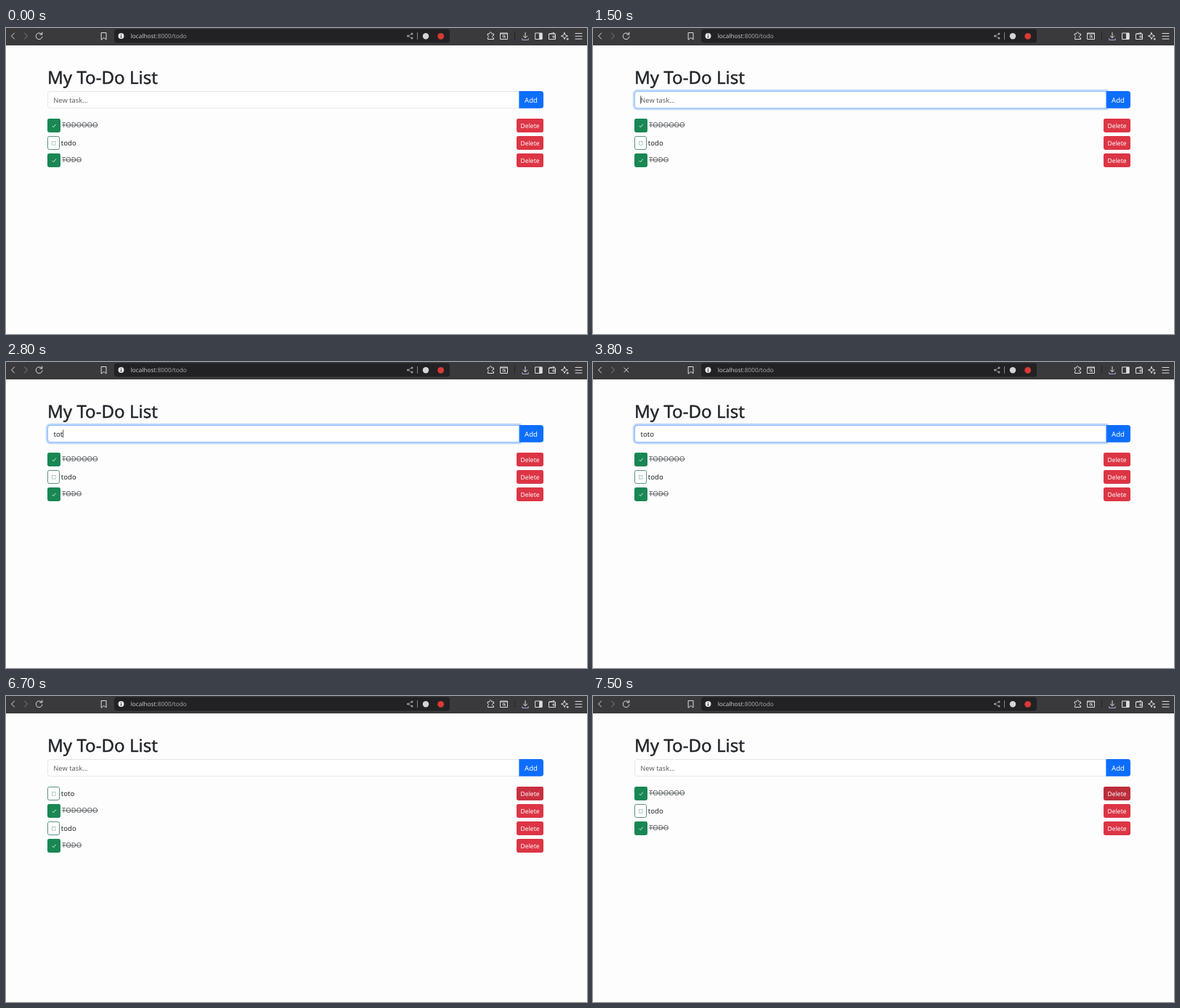
An HTML page for the animation above (8000 ms loop, 800 by 422 pixels).

```html
<!DOCTYPE html>
<html lang="en">
<head>
<meta charset="utf-8">
<title>My To-Do List</title>
<style>
  html, body { margin: 0; width: 100%; height: 100%; overflow: hidden; background: #fdfdfd; }
  svg { display: block; width: 100%; height: 100%; }
  text { font: 9.6px "Noto Sans", "Open Sans", sans-serif; fill: #212529; text-rendering: geometricPrecision; }
  .title { font-size: 24.1px; stroke: #212529; stroke-width: .4px; }
  .hint { font-size: 9.3px; fill: #5c6064; }
  .url { font-size: 8.25px; fill: #c9c9cc; }
  .url tspan { fill: #a4a4a8; }
  .small { font-size: 8.55px; fill: #fff; }
  .light { fill: #fff; }
  .done { fill: #585c5f; text-decoration: line-through; }
  .icon { fill: none; stroke: #dedee0; stroke-width: 1; stroke-linecap: round; stroke-linejoin: round; }
  .dim { stroke: #85858a; }
  .delete { color: #dc3545; }

  .anim { animation: 8s step-end infinite; }
  .idle { animation-name: idle; }
  .busy { animation-name: busy; }
  .focus { animation-name: focus; }
  .placeholder { animation-name: placeholder; }
  .caret { animation-name: caret; }
  .k1 { animation-name: key1; }
  .k2 { animation-name: key2; }
  .k3 { animation-name: key3; }
  .k4 { animation-name: key4; }
  .added { animation-name: added; }
  .list { animation-name: shift; }
  .press { animation-name: press; }
  .hover { animation-name: hover; }

  @keyframes idle {
    0%, 50%, 92.5% { visibility: visible; }
    47.5%, 90% { visibility: hidden; }
  }
  @keyframes busy {
    0%, 50%, 92.5% { visibility: hidden; }
    47.5%, 90% { visibility: visible; }
  }
  @keyframes focus {
    0%, 48.75% { opacity: 0; }
    17.5% { opacity: .4; }
    18.75% { opacity: .9; }
    20% { opacity: 1; }
  }
  @keyframes placeholder {
    0%, 48.75% { visibility: visible; }
    31.25% { visibility: hidden; }
  }
  @keyframes caret {
    0%, 23.75%, 45%, 100% { visibility: hidden; transform: none; }
    17.5% { visibility: visible; transform: none; }
    31.25% { visibility: visible; transform: translateX(3.7px); }
    33.75% { visibility: visible; transform: translateX(9.4px); }
    35% { visibility: visible; transform: translateX(12.9px); }
    37.5% { visibility: visible; transform: translateX(18.8px); }
  }
  @keyframes key1 { 0%, 48.75% { visibility: hidden; } 31.25% { visibility: visible; } }
  @keyframes key2 { 0%, 48.75% { visibility: hidden; } 33.75% { visibility: visible; } }
  @keyframes key3 { 0%, 48.75% { visibility: hidden; } 35% { visibility: visible; } }
  @keyframes key4 { 0%, 48.75% { visibility: hidden; } 37.5% { visibility: visible; } }
  @keyframes added { 0%, 91.25% { visibility: hidden; } 48.75% { visibility: visible; } }
  @keyframes shift {
    0%, 91.25% { transform: none; }
    48.75% { transform: translateY(24px); }
  }
  @keyframes press {
    0% { color: #dc3545; }
    83.75% { color: #c9303f; }
    85% { color: #bb2d3b; }
    88.75% { color: #b02a37; }
  }
  @keyframes hover {
    0% { color: #dc3545; }
    92.5% { color: #c9303f; }
    93.75% { color: #bb2d3b; }
  }
</style>
</head>
<body>
<svg viewBox="0 0 800 422">
  <defs>
    <g id="delete">
      <rect x="703" width="37" height="19" rx="2.4" fill="currentColor"/>
      <text class="small" x="708.6" y="12.6">Delete</text>
    </g>
    <g id="checked">
      <rect x="57" width="18" height="19" rx="2.4" fill="#198754"/>
      <path d="M63.6 10l1.8 1.8 3.3-4.1" fill="none" stroke="#e4f1ea" stroke-width=".9"/>
    </g>
    <g id="unchecked">
      <rect x="57.5" y=".5" width="16" height="18" rx="2.2" fill="#fff" stroke="#5b917f"/>
      <rect x="63.3" y="7.4" width="4.8" height="4.8" fill="none" stroke="#93b8a0" stroke-width=".7"/>
    </g>
  </defs>

  <rect width="800" height="422" fill="#fdfdfd"/>

  <!-- Browser toolbar -->
  <rect width="800" height="24" fill="#3a3a3d"/>
  <rect x="149" y="1.5" width="462" height="19" rx="4" fill="#222225"/>
  <g class="icon">
    <path d="M11.5 7l-4 4 4 4"/>
    <path class="dim" d="M25.5 7l4 4-4 4"/>
    <path class="anim idle" d="M49.2 8.6a4.4 4.4 0 1 0 .8 3.4M49.8 6v3h-3"/>
    <path class="anim busy" d="M42.8 8l6 6M48.8 8l-6 6"/>
    <path d="M131.5 6.5h6.5v9.5l-3.25-2.6-3.25 2.6z"/>
    <path class="dim" d="M559 8l-5.5 3 5.5 3"/>
    <path class="dim" d="M566.5 6.5v9"/>
    <path d="M663.5 8h2.3a1.6 1.6 0 1 1 3 0h2.7v2.5a1.6 1.6 0 1 0 0 3v2h-8v-2.3a1.6 1.6 0 0 0 0-2.9z"/>
    <path d="M681 7h9.5v8.5H681zM681 8h9.5"/>
    <circle cx="685.5" cy="11.5" r="1.5"/>
    <path d="M686.7 12.7l1 1"/>
    <path d="M700.5 6v10" stroke="#242427"/>
    <path d="M715 6.5v7M712.3 11l2.7 2.7 2.7-2.7"/>
    <path d="M710.8 14.5v2h8.4v-2" stroke="#aaa8d0"/>
    <path d="M729 7h9v8.5h-9z"/>
    <path d="M735 7.5h3v7.5h-3z" fill="#dedee0"/>
    <path d="M747.5 8.5v7h9v-7zM747.5 8.5l7-2v2M753.5 11h3v2h-3z"/>
    <path d="M769 6.5l1.3 3.2 3.2 1.3-3.2 1.3-1.3 3.2-1.3-3.2-3.2-1.3 3.2-1.3zM773.2 14v2.4M772 15.2h2.4"/>
    <path d="M784 7.5h9M784 11.3h9M784 15.1h9"/>
  </g>
  <g fill="#9a9a9f">
    <circle cx="559" cy="8" r="1.5"/>
    <circle cx="553.5" cy="11" r="1.5"/>
    <circle cx="559" cy="14" r="1.5"/>
  </g>
  <circle cx="158.5" cy="11" r="4" fill="#e6e6e8"/>
  <path d="M158.5 8.5v1M158.5 10.5v3" stroke="#222225"/>
  <circle cx="578" cy="11.3" r="4.2" fill="#d4d4d8"/>
  <circle cx="598.7" cy="11.3" r="4.4" fill="#d93a35"/>
  <text class="url" x="171.7" y="14.2">localhost<tspan>:8000/todo</tspan></text>

  <!-- Task form -->
  <text class="title" x="57" y="76.7">My To-Do List</text>
  <path d="M707 87.5H61a3.5 3.5 0 0 0-3.5 3.5v16a3.5 3.5 0 0 0 3.5 3.5h646z" fill="#fff" stroke="#dee2e6" stroke-width=".8"/>
  <path d="M706.4 87h30a3.6 3.6 0 0 1 3.6 3.6v16.6a3.6 3.6 0 0 1-3.6 3.6h-30z" fill="#0d6efd"/>
  <text class="light" x="714" y="102.6">Add</text>
  <g class="anim focus" fill="none">
    <path d="M708.2 86H61a5 5 0 0 0-5 5v16a5 5 0 0 0 5 5h647.2z" stroke="#0d6efd" stroke-opacity=".27" stroke-width="2.4" stroke-linejoin="round"/>
    <path d="M706.8 87.5H61a3.5 3.5 0 0 0-3.5 3.5v16a3.5 3.5 0 0 0 3.5 3.5h645.8z" stroke="#86b7fe" stroke-width=".9"/>
  </g>
  <text class="hint anim placeholder" x="65.3" y="102.6">New task...</text>
  <text x="65.5" y="102.6"><tspan class="anim k1">t</tspan><tspan class="anim k2">o</tspan><tspan class="anim k3">t</tspan><tspan class="anim k4">o</tspan></text>
  <rect class="anim caret" x="65.4" y="93.5" width=".8" height="11" fill="#212529"/>

  <!-- Tasks -->
  <g class="anim added">
    <g transform="translate(0 125)">
      <use href="#unchecked"/>
      <text x="75.8" y="12.5">toto</text>
      <use href="#delete" class="delete anim press"/>
    </g>
  </g>
  <g class="anim list">
    <g transform="translate(0 125)">
      <use href="#checked"/>
      <text class="done" x="77" y="12.3">TODOOOO</text>
      <use href="#delete" class="delete anim hover"/>
    </g>
    <g transform="translate(0 149)">
      <use href="#unchecked"/>
      <text x="75.8" y="12.5">todo</text>
      <use href="#delete" class="delete"/>
    </g>
    <g transform="translate(0 173)">
      <use href="#checked"/>
      <text class="done" x="77" y="12.3">TODO</text>
      <use href="#delete" class="delete"/>
    </g>
  </g>
</svg>
</body>
</html>
```
